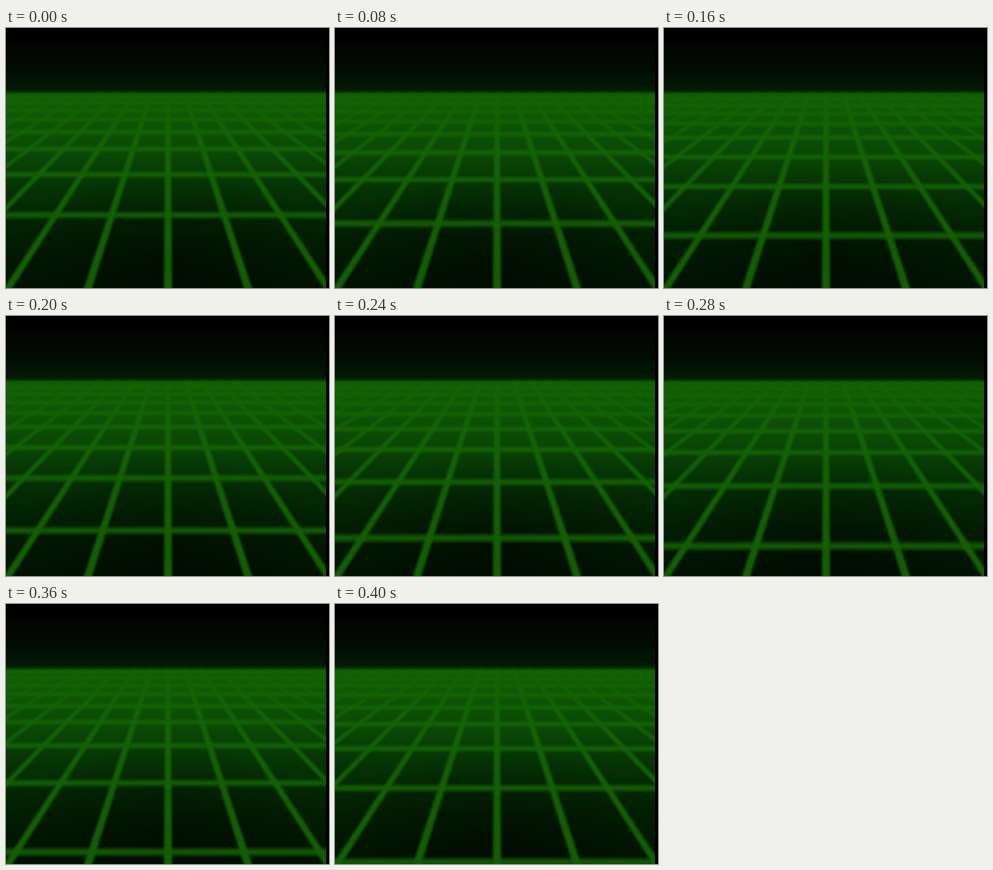
Write an HTML page without scripts that moves like this. It is 323 px wide and 260 px high and loops after 420 ms.

```html
<!DOCTYPE html>
<html lang="en">
<head>
<meta charset="utf-8">
<title>Neon grid</title>
<style>
  @property --travel { syntax: "<number>"; inherits: true; initial-value: 0; }

  html, body { margin: 0; width: 100%; height: 100%; overflow: hidden; background: #000; }

  .stage {
    position: relative;
    width: 320px;
    height: 260px;
    overflow: hidden;
    background:
      radial-gradient(170px 100px at 162px 240px, rgb(0 0 0 / .4), transparent),
      linear-gradient(
        #000 10px, #020502 20px, #020b02 40px, #021802 60px, #032203 63px,
        #0a4803 65px, #105e04 67px, #0f5a04 80px, #0d5204 100px, #0a4804 125px,
        #063904 150px, #032a03 180px, #021e02 210px, #011202 260px);
  }

  .grid {
    --line: #156604;
    position: absolute;
    inset: 0;
    mask-image: linear-gradient(transparent 63px, rgb(0 0 0 / .65) 68px, rgb(0 0 0 / .9) 110px);
    animation: drive 420ms infinite;
  }

  /* The first pose holds for 40 ms, the other nineteen for 20 ms each. */
  @keyframes drive {
    0% { --travel: 0; animation-timing-function: steps(1); }
    9.5238% { --travel: .05; animation-timing-function: steps(19); }
    100% { --travel: 1; }
  }

  /* Perspective: screen depth below the vanishing point is 564px / distance. */
  .row {
    --drop: calc(564px / (var(--row) + .26 - var(--travel)));
    --thick: calc(5px + var(--drop) * .03);
    position: absolute;
    left: 0;
    width: 100%;
    top: calc(14px + var(--drop) - var(--thick) / 2);
    height: var(--thick);
    background: linear-gradient(transparent, var(--line) 42% 58%, transparent);
    opacity: .9;
  }

  svg { position: absolute; inset: 0; fill: var(--line); }
  .rays { filter: blur(1.3px); }
  .ray { transform: matrix(1, 0, calc(var(--ray) * .325), 1, 0, 0); }
</style>
</head>
<body>
<div class="stage">
  <div class="grid">
    <i class="row" style="--row:3"></i>
    <i class="row" style="--row:4"></i>
    <i class="row" style="--row:5"></i>
    <i class="row" style="--row:6"></i>
    <i class="row" style="--row:7"></i>
    <i class="row" style="--row:8"></i>
    <i class="row" style="--row:9"></i>
    <i class="row" style="--row:10"></i>
    <i class="row" style="--row:11"></i>
    <svg width="320" height="260">
      <defs>
        <path id="wedge" d="M-2.4 46H2.4L4.2 254H-4.2Z"/>
      </defs>
      <g class="rays">
        <g transform="translate(162 14)">
          <use href="#wedge"/>
          <g id="side">
            <use class="ray" href="#wedge" style="--ray:1"/>
            <use class="ray" href="#wedge" style="--ray:2"/>
            <use class="ray" href="#wedge" style="--ray:3"/>
            <use class="ray" href="#wedge" style="--ray:4"/>
            <use class="ray" href="#wedge" style="--ray:5"/>
            <use class="ray" href="#wedge" style="--ray:6"/>
            <use class="ray" href="#wedge" style="--ray:7"/>
            <use class="ray" href="#wedge" style="--ray:8"/>
            <use class="ray" href="#wedge" style="--ray:9"/>
          </g>
          <use href="#side" transform="scale(-1 1)"/>
        </g>
      </g>
    </svg>
  </div>
</div>
</body>
</html>
```
